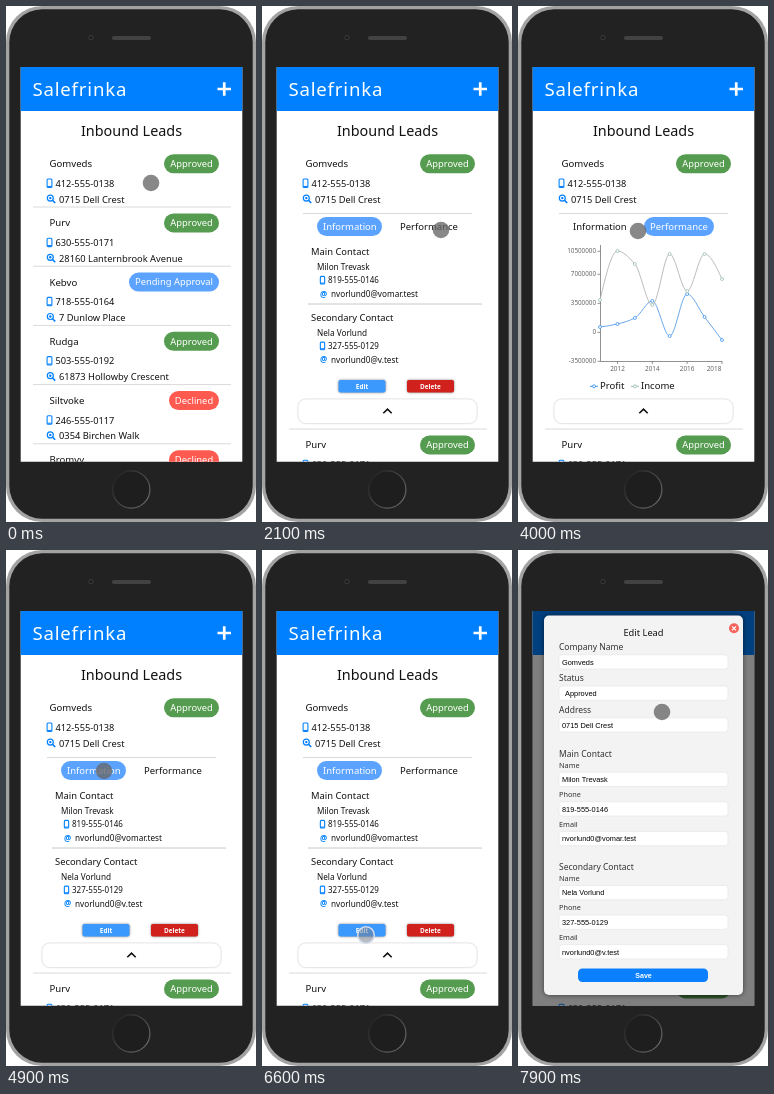
An HTML page with a canvas for the animation above (8000 ms loop, 250 by 516 pixels).

```html
<!DOCTYPE html>
<html lang="en">
<head>
<meta charset="utf-8">
<style>
html, body { margin: 0; width: 100%; height: 100%; overflow: hidden; background: #fff }
canvas { display: block; width: 250px; height: 516px }
</style>
</head>
<body>
<canvas id="stage"></canvas>
<script>
const LOOP = 8000, STEP = 100;
const SANS = '"Noto Sans", "Open Sans", sans-serif', FORM = '"Liberation Sans", Arial, sans-serif';
const BLUE = '#0080ff', SKY = '#5ba3ff', GREEN = '#569c50', RED = '#ff5a50';
const OPEN_HEIGHT = 222, PITCH = 59.2;

const status = {
  Approved: [158, GREEN],
  'Pending Approval': [123, SKY],
  Declined: [163, RED]
};
const leads = [
  ['Gomveds', '412-555-0138', '0715 Dell Crest', 'Approved'],
  ['Purv', '630-555-0171', '28160 Lanternbrook Avenue', 'Approved'],
  ['Kebvo', '718-555-0164', '7 Dunlow Place', 'Pending Approval'],
  ['Rudga', '503-555-0192', '61873 Hollowby Crescent', 'Approved'],
  ['Siltvoke', '246-555-0117', '0354 Birchen Walk', 'Declined'],
  ['Bromvy', '365-555-0183', '92 Oakmere Road', 'Declined']
];
const contacts = [
  ['Main Contact', 'Milon Trevask', '819-555-0146', 'nvorlund0@vomar.test'],
  ['Secondary Contact', 'Nela Vorlund', '327-555-0129', 'nvorlund0@v.test']
];
const profit = [321, 318, 312, 295, 330, 288, 311, 334];
const income = [294, 245, 258, 299, 248, 285, 248, 273];

// Pointer: time, x, y
const path = [
  [0, 145, 177], [1200, 145, 177], [2000, 179, 224], [3400, 179, 224],
  [4000, 120, 225], [4300, 98, 221], [4900, 98, 221], [5400, 110, 255],
  [6100, 104, 385], [7200, 104, 385], [7800, 144, 162], [8000, 144, 162]
];
const presses = [[2300, 2500], [4400, 4600], [6600, 7100]];
const TO_CHART = 2400, TO_INFO = 4500, EDIT = 6800;

const canvas = document.getElementById('stage'), c = canvas.getContext('2d');
const ratio = window.devicePixelRatio || 1;
canvas.width = 250 * ratio;
canvas.height = 516 * ratio;

const progress = (t, start, length) => Math.min(1, Math.max(0, (t - start) / length));
const easeOut = (p, power) => 1 - (1 - p) ** power;

function text(s, x, y, size, { color = '#111', weight = 400, align = 'left', font = SANS, gap = 0 } = {}) {
  c.font = `${weight} ${size}px ${font}`;
  c.letterSpacing = gap + 'px';
  c.textAlign = align;
  c.fillStyle = color;
  c.fillText(s, x, y + size * .36);
}

function paint(fill, stroke, line) {
  if (fill) { c.fillStyle = fill; c.fill(); }
  if (stroke) { c.strokeStyle = stroke; c.lineWidth = line; c.stroke(); }
}

function box(x, y, w, h, r, fill, stroke, line = 1) {
  c.beginPath();
  c.roundRect(x, y, w, h, r);
  paint(fill, stroke, line);
}

function circle(x, y, r, fill, stroke, line = 1) {
  c.beginPath();
  c.arc(x, y, r, 0, 7);
  paint(fill, stroke, line);
}

function lines(points, color, width = 1) {
  c.beginPath();
  points.forEach(([x, y], i) => i ? c.lineTo(x, y) : c.moveTo(x, y));
  paint(null, color, width);
}

function clipped(x, y, w, h, draw) {
  c.save();
  c.beginPath();
  c.rect(x, y, w, h);
  c.clip();
  draw();
  c.restore();
}

function shadowed(color, blur, draw) {
  c.save();
  c.shadowColor = color;
  c.shadowBlur = blur * ratio;
  draw();
  c.restore();
}

const rule = (x1, x2, y, color = '#dadada') => lines([[x1, y], [x2, y]], color);

function mobileIcon(x, y, s = 1) {
  box(x - 2.4 * s, y - 4.2 * s, 4.8 * s, 8.4 * s, 1, null, BLUE, 1.1);
  rule(x - 2 * s, x + 2 * s, y + 3.2 * s, BLUE);
}

function placeIcon(x, y) {
  circle(x - .7, y - .8, 3, null, BLUE, 1.2);
  circle(x - .7, y - .8, 1.2, BLUE);
  lines([[x + 1.6, y + 1.5], [x + 4.2, y + 4.1]], BLUE, 1.6);
}

function phoneBody() {
  c.fillStyle = '#fff';
  c.fillRect(0, 0, 250, 516);
  box(0, 0, 250, 516, 36, '#a3a3a3');
  box(3.3, 3.3, 243.4, 509.4, 33, '#222');
  circle(85, 31.7, 2.1, '#1a1a20', '#424242', .9);
  box(106, 30, 39, 4, 2, '#424242');
  const ring = c.createLinearGradient(110, 470, 143, 497);
  ring.addColorStop(0, '#262626');
  ring.addColorStop(1, '#6c6c6c');
  circle(125.3, 483.5, 18.6, '#1e1e1e', ring, 1.2);
}

function header() {
  c.fillStyle = BLUE;
  c.fillRect(14, 61, 223, 44);
  text('Salefrinka', 26.5, 83.5, 18.6, { color: '#fff', weight: 500, gap: .8 });
  lines([[211.5, 83], [225, 83]], '#fff', 2.7);
  lines([[218.25, 76.3], [218.25, 89.7]], '#fff', 2.7);
  text('Inbound Leads', 125.5, 124.5, 14.4, { align: 'center' });
}

function lead([name, phone, address, state], y, ruleY) {
  const [x, color] = status[state];
  text(name, 43.5, y, 9.6);
  box(x, y - 9.5, 213 - x, 19, 9.5, color);
  text(state, (x + 213) / 2, y, 9.4, { color: '#fff', weight: 500, align: 'center' });
  mobileIcon(43.5, y + 19.5);
  text(phone, 49.5, y + 19.8, 9.25);
  placeIcon(45, y + 35.2);
  text(address, 53, y + 35.5, 9.3);
  rule(27, 225, ruleY);
}

function tabs(chart) {
  rule(41, 210, 207.5);
  if (chart) box(126, 211, 70, 19, 9.5, SKY);
  else box(55, 211, 65, 19, 9.5, SKY);
  text('Information', chart ? 55 : 61, 220.3, 9.5, { color: chart ? '#111' : '#fff' });
  text('Performance', chart ? 132 : 138, 220.3, 9.5, { color: chart ? '#fff' : '#111' });
}

function info(focused) {
  contacts.forEach(([title, name, phone, mail], i) => {
    const y = 245.5 + i * 65.7;
    text(title, 49, y, 9.4, { weight: 500 });
    text(name, 55, y + 16, 8.2, { weight: 500 });
    mobileIcon(60.5, y + 28.7, .9);
    text(phone, 66, y + 28.7, 8, { weight: 500 });
    text('@', 58, y + 42.3, 8, { color: BLUE, weight: 700 });
    text(mail, 69, y + 42.8, 8.2, { weight: 500 });
  });
  rule(46, 220, 298, '#c8c8c8');
  [['Edit', 76.5, '#3b99fd'], ['Delete', 145, '#d0211c']].forEach(([label, x, color]) => {
    shadowed('#0008', 2.5, () => box(x, 374, 47, 12.5, 2, color));
    text(label, x + 23.5, 380.3, 6.4, { color: '#fff', weight: 700, align: 'center' });
  });
  if (focused) box(75, 372, 50.5, 17, 2, null, '#ff7a50', 1.2);
}

// Monotone cubic through evenly spaced points
function curve(ys, color) {
  const n = ys.length - 1, dx = 122 / n;
  const s = ys.slice(1).map((y, i) => y - ys[i]);
  const m = ys.map((_, i) => {
    const a = s[i - 1], b = s[i];
    return a * b > 0 ? 2 * a * b / (a + b) : 0;
  });
  m[0] = (3 * s[0] - m[1]) / 2;
  m[n] = (3 * s[n - 1] - m[n - 1]) / 2;
  c.beginPath();
  c.moveTo(82, ys[0]);
  for (let i = 0; i < n; i++) {
    const x = 82 + i * dx;
    c.bezierCurveTo(x + dx / 3, ys[i] + m[i] / 3, x + dx * 2 / 3, ys[i + 1] - m[i + 1] / 3, x + dx, ys[i + 1]);
  }
  paint(null, color, .9);
}

function chart(p) {
  const axis = '#777', label = { color: '#666', align: 'right' };
  lines([[82.5, 239], [82.5, 355.5], [204, 355.5]], axis, .8);
  [['10500000', 245], ['7000000', 268], ['3500000', 297], ['0', 326], ['-3500000', 355]].forEach(([s, y]) => {
    text(s, 78, y, 6.3, label);
    lines([[79.5, y + .3], [82.5, y + .3]], axis, .8);
  });
  [[2012, 99.5], [2014, 134.3], [2016, 169.1], [2018, 204]].forEach(([year, x]) => {
    text(year, Math.min(x, 196), 363, 6.4, { color: '#666', align: 'center' });
    lines([[x, 355], [x, 358]], axis, .8);
  });
  [['Profit', profit, '#5b9fe8', '#3f94f0', 72], ['Income', income, '#b4b4b4', '#9dbfae', 113]].forEach(([name, ys, color, dot, x]) => {
    clipped(80, 230, 2 + 124 * p, 130, () => curve(ys, color));
    if (p === 1) ys.forEach((y, i) => circle(82 + i * 122 / 7, y, 1.5, '#fff', dot, .8));
    rule(x, x + 8, 380.3, dot);
    circle(x + 4, 380.3, 1.5, '#fff', dot, .9);
    text(name, x + 10, 380, 9.5);
  });
}

function page(t, shift) {
  c.fillStyle = '#fff';
  c.fillRect(14, 61, 223, 396);
  header();
  leads.forEach((row, i) => {
    const y = 157.7 + i * PITCH + (i ? shift : 0);
    lead(row, y, 201 + i * PITCH + shift);
  });
  const charted = t >= TO_CHART && t < TO_INFO;
  clipped(14, 201.5, 223, Math.max(0, shift - 1), () => {
    tabs(charted);
    if (charted) chart(easeOut(progress(t, TO_CHART, 1500), 2));
    else info(t >= EDIT - 100);
    const y = 171 + shift;
    shadowed('#0002', 2, () => box(36, y, 179, 24.5, 8, '#fff'));
    box(36, y, 179, 24.5, 8, null, '#e4e4e4', .8);
    lines([[121.3, y + 14.3], [125.5, y + 10.2], [129.7, y + 14.3]], '#111', 1.6);
  });
}

function field(label, value, y, size) {
  text(label, 41, y, size, { color: '#333' });
  const top = y + (size > 8 ? 8 : 7.2);
  box(41, top, 169, 14.3, 3, '#fff', '#e2e2e2', .6);
  text(value, label === 'Status' ? 47 : 44, top + 7.3, 7.4, { font: FORM, color: '#000' });
}

function modal() {
  shadowed('#0008', 5, () => box(26, 65.5, 199, 379.5, 5, '#f3f3f3'));
  text('Edit Lead', 125.5, 82.3, 9.3, { weight: 500, align: 'center' });
  circle(216, 78.3, 5, '#f4625b');
  lines([[214, 76.3], [218, 80.3]], '#fff', 1.2);
  lines([[218, 76.3], [214, 80.3]], '#fff', 1.2);
  const [name, , address, state] = leads[0];
  field('Company Name', name, 96.8, 8.5);
  field('Status', state, 128, 8.5);
  field('Address', address, 159.8, 8.5);
  contacts.forEach(([title, ...values], i) => {
    const y = 204 + i * 113.2;
    text(title, 41, y, 8.5, { color: '#333' });
    ['Name', 'Phone', 'Email'].forEach((label, k) => field(label, values[k], y + 11 + k * 29.6, 7.3));
  });
  box(60, 418.5, 130, 13.5, 4.5, '#0a80ff');
  text('Save', 125.5, 425.3, 7.1, { color: '#fff', weight: 700, align: 'center', font: FORM });
}

function pointer(t) {
  const k = path.findIndex(p => p[0] > t);
  const [t0, x0, y0] = path[k - 1], [t1, x1, y1] = path[k];
  const p = (t - t0) / (t1 - t0);
  const x = x0 + (x1 - x0) * p, y = y0 + (y1 - y0) * p;
  if (presses.some(([a, b]) => t >= a && t < b)) circle(x, y, 8.3, '#78829088', '#d5dcec', 1.5);
  else circle(x, y, 8.3, '#686868c8');
}

function draw(t) {
  c.setTransform(ratio, 0, 0, ratio, 0, 0);
  phoneBody();
  clipped(14.7, 61, 221.6, 394.7, () => {
    page(t, OPEN_HEIGHT * easeOut(progress(t, 0, 600), 2));
    const p = progress(t, EDIT, 400);
    if (p > 0) {
      c.fillStyle = `rgba(0,0,0,${.5 * easeOut(p, 3)})`;
      c.fillRect(14, 60, 223, 397);
      c.save();
      c.translate(0, -400 * (1 - easeOut(p, 1.27)));
      modal();
      c.restore();
    }
    pointer(t);
  });
}

const begin = performance.now();
function frame() {
  const t = (performance.now() - begin) % LOOP;
  draw(Math.floor(t / STEP) * STEP);
  requestAnimationFrame(frame);
}
frame();
</script>
</body>
</html>
```
